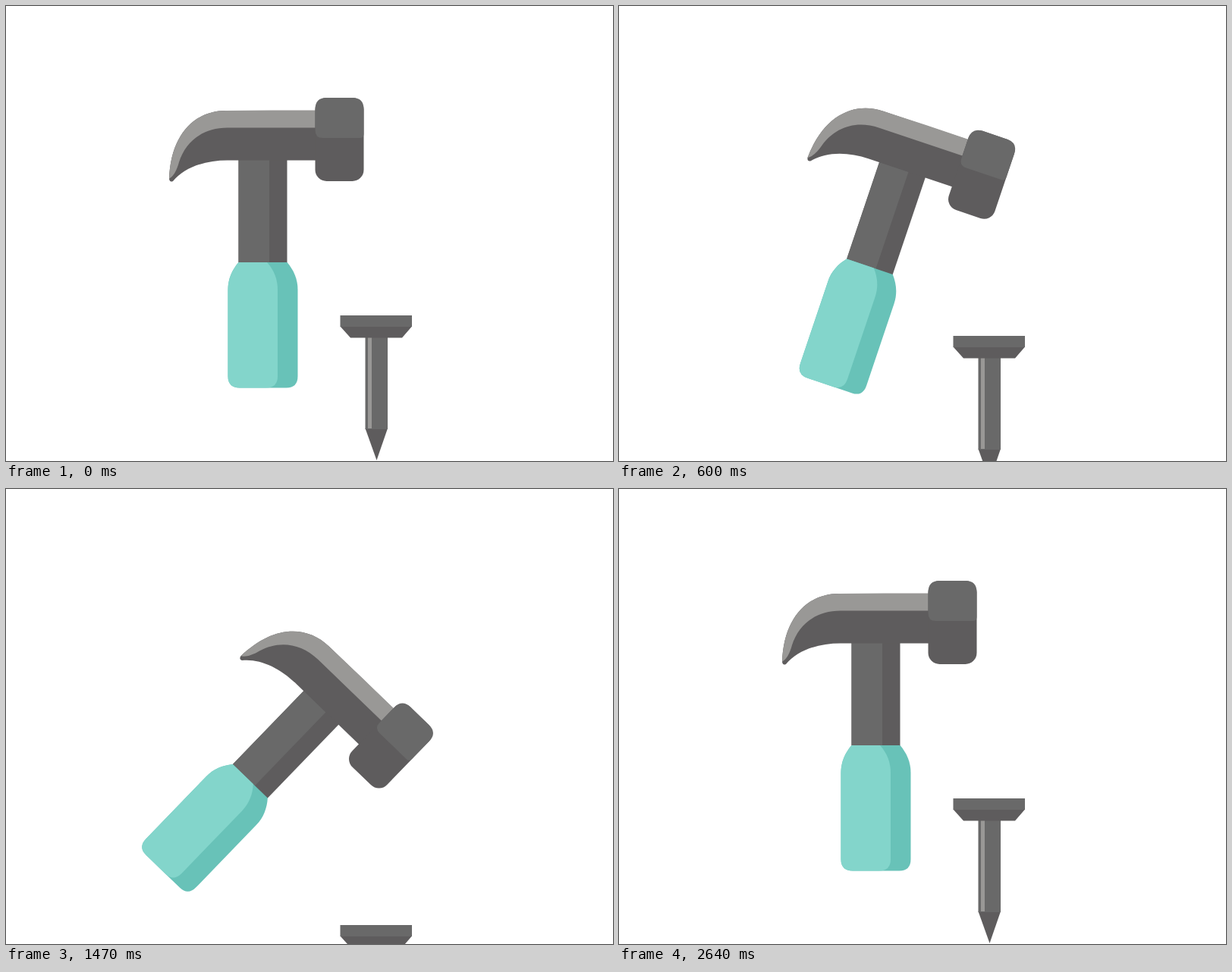
These frames come from a looping animation (800x600 px, 3.27 s). An HTML page:

```html
<!DOCTYPE html>
<html lang="en">
<head>
<meta charset="utf-8">
<title>Hammer and nail</title>
<style>
  html, body { margin: 0; width: 100%; height: 100%; overflow: hidden; background: #fff; }
  svg { display: block; width: 100%; height: 100%; }
  .pale { fill: #999896; }
  .mid { fill: #696969; }
  .dark { fill: #5e5c5d; }
  .teal { fill: #83d5cb; }
  .shade { fill: #68c2b8; }
</style>
</head>
<body>
<svg viewBox="0 0 800 600">
  <g id="nail">
    <path class="dark" d="M473.5 557H503L488.5 599Z"/>
    <path class="mid" d="M473.5 437H503V558H473.5Z"/>
    <path class="pale" d="M477 437H482V557H477Z"/>
    <path class="dark" d="M440.5 422.5H535L522 437.5H454Z"/>
    <path class="mid" d="M440.5 408H535V423H440.5Z"/>
  </g>
  <g id="hammer">
    <path class="dark" d="M306.5 200H370.5V339H306.5Z"/>
    <path class="mid" d="M306.5 203H347V339H306.5Z"/>
    <path class="shade" d="M306.5 338H370.5C379 348 384.5 360 384.5 374V488Q384.5 503.500 369.500 503.500H308Q292.500 503.500 292.500 488V374C292.500 360 298 348 306.500 338Z"/>
    <path class="teal" d="M306.5 338H344C353 348 358 360 358 374V488Q358 503.500 343 503.500H308Q292.500 503.500 292.500 488V374C292.500 360 298 348 306.500 338Z"/>
    <path class="dark" d="M410 138H290C248 138 217 170 215 228Q216 233 220 231C235 213 262 203.500 292 203.500H410Z"/>
    <path class="pale" d="M410 137.500H350L290 138C248 138 217 170 215 228C221 224 225 217 228 206C236 180 258 160.500 292 160.500H410Z"/>
    <rect class="dark" x="407.500" y="121" width="64" height="110" rx="15"/>
    <path class="mid" d="M407.500 136Q407.500 121 422.500 121H456.500Q471.500 121 471.500 136V169Q471.500 174 466 174H417.500Q407.500 174 407.500 164Z"/>
  </g>
</svg>
<script>
const STEP = 30, LOOP = 3270;
const hammer = document.getElementById('hammer');
const nail = document.getElementById('nail');

const rush = p => s => s ** p;
const settle = p => s => 1 - (1 - s) ** p;
const smooth = s => s * s * (3 - 2 * s);
const drift = s => 1 - 0.65 * (1 - s) - 0.35 * (1 - s) ** 4;
const hold = () => 0;

// Keys: [step, value, easing into this key]
const turn = [
  [0, 0], [7, 90, rush(1.86)], [17, 0, settle(1.55)],
  [24, 90, rush(1.86)], [33.5, 0, settle(1.55)],
  [40, 90, rush(1.86)], [66, 0, drift]
];
const lift = [
  [0, 0], [7, -32, rush(1.386)], [17, 0, settle(3.3)],
  [24, 28, rush(1.386)], [33.5, 10, settle(1.19)],
  [40, 135, rush(1.386)], [57, 0, settle(1.12)]
];
const sink = [
  [0, 0], [7, 0, hold], [9, 27, settle(2)],
  [23, 27, hold], [24.5, 60, settle(1.5)],
  [38.5, 60, hold], [40, 167, settle(1.3)],
  [67, 167, hold], [81, -50, smooth],
  [82, -50, hold], [88, 0, smooth]
];

function at(keys, f) {
  const i = keys.findIndex(k => k[0] > f);
  if (i < 0) return keys[keys.length - 1][1];
  const [t0, v0] = keys[i - 1], [t1, v1, ease] = keys[i];
  return v0 + (v1 - v0) * ease((f - t0) / (t1 - t0));
}

function draw(ms) {
  const f = Math.floor((ms % LOOP) / STEP);
  hammer.setAttribute('transform',
    `translate(0 ${at(lift, f).toFixed(2)}) rotate(${at(turn, f).toFixed(2)} 343.5 312)`);
  nail.setAttribute('transform', `translate(0 ${at(sink, f).toFixed(2)})`);
}

const start = performance.now();
function tick() {
  draw(performance.now() - start);
  requestAnimationFrame(tick);
}
draw(0);
requestAnimationFrame(tick);
</script>
</body>
</html>
```
